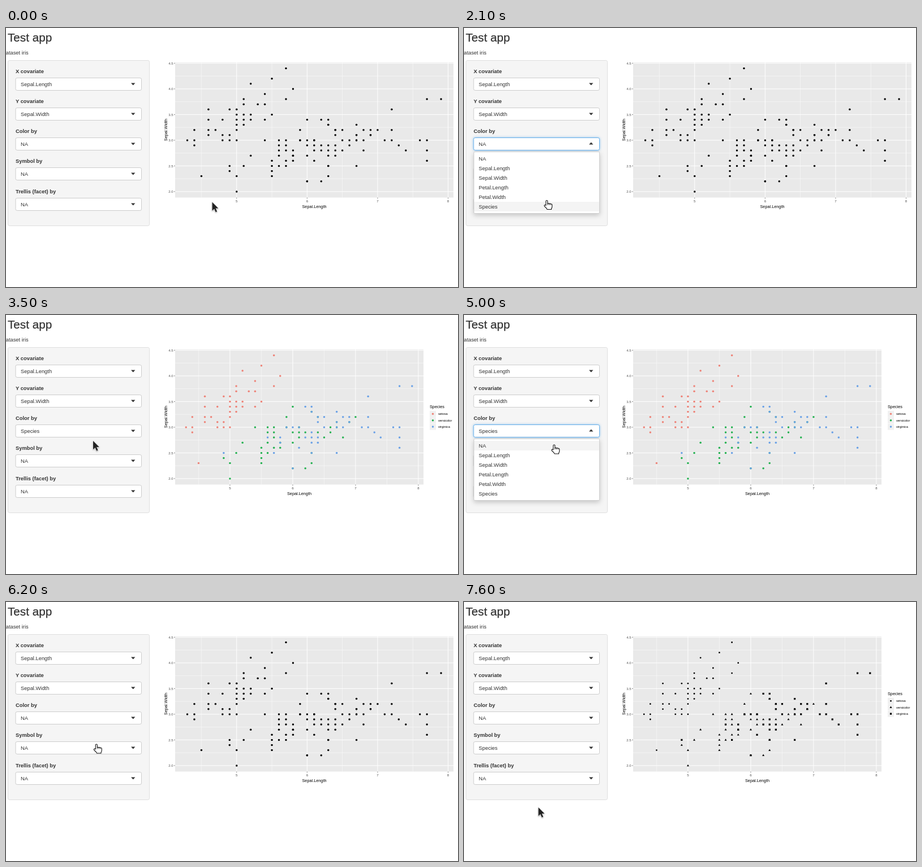
Recreate the animation shown at these times as an HTML page. Size 799 by 459 pixels, loop 8 s.

```html
<!DOCTYPE html>
<html lang="en">
<head>
<meta charset="utf-8">
<title>Test app</title>
<style>
  html, body { margin: 0; width: 100%; height: 100%; overflow: hidden; background: #fff; }
  svg { display: block; width: 799px; height: 459px; }
  text { font: 9.35px "Liberation Sans", Arial, sans-serif; fill: #333; white-space: pre; }
  .title { font-size: 20.7px; stroke: #333; stroke-width: .25px; }
  .label { font-weight: bold; }
  .well { fill: #f5f5f5; stroke: #dfdfdf; }
  .box { fill: #fff; stroke: #ccc; }
  .open .box { stroke: #66afe9; filter: drop-shadow(0 0 2px rgba(102, 175, 233, .7)); }
  .menu { fill: #fff; stroke: #d0d0d0; filter: drop-shadow(0 3px 4px rgba(0, 0, 0, .2)); }
  .hover { fill: #f4f4f4; }
  .axis { font-size: 7.3px; fill: #000; }
  .tick { font-size: 6px; fill: #4d4d4d; }
  .key { font-size: 5.7px; fill: #000; }
  .major { stroke: #fff; stroke-width: 1; }
  .minor { stroke: #fff; stroke-width: .45; }
  .mark { stroke: #555; stroke-width: .7; }
</style>
</head>
<body>
<svg id="stage" viewBox="0 0 799 459"></svg>
<script>
const LOOP = 8000, STEP = 100;
const stage = document.getElementById('stage');
const labels = ['X covariate', 'Y covariate', 'Color by', 'Symbol by', 'Trellis (facet) by'];
const options = ['NA', 'Sepal.Length', 'Sepal.Width', 'Petal.Length', 'Petal.Width', 'Species'];
const ROW = 17;

// Sepal widths by sepal length, both in tenths.
const species = [
  { name: 'setosa', color: '#ee8277', points: {
    43: [30], 44: [29, 30, 32], 45: [23], 46: [31, 32, 34, 36], 47: [32], 48: [30, 31, 34],
    49: [30, 31, 36], 50: [30, 32, 33, 34, 35, 36], 51: [33, 34, 35, 37, 38], 52: [34, 35, 41],
    53: [37], 54: [34, 37, 39], 55: [35, 42], 57: [38, 44], 58: [40] } },
  { name: 'versicolor', color: '#22b14f', points: {
    49: [24], 50: [20, 23], 51: [25], 52: [27], 54: [30], 55: [23, 24, 25, 26],
    56: [25, 27, 29, 30], 57: [26, 28, 29, 30], 58: [26, 27], 59: [30, 32], 60: [22, 27, 29, 34],
    61: [28, 29, 30], 62: [22, 29], 63: [23, 25, 33], 64: [29, 32], 65: [28], 66: [29, 30],
    67: [30, 31], 68: [28], 69: [31], 70: [32] } },
  { name: 'virginica', color: '#68a0e6', points: {
    49: [25], 56: [28], 57: [25], 58: [27, 28], 59: [30], 60: [22, 30], 61: [26, 30], 62: [28, 34],
    63: [25, 27, 28, 29, 33, 34], 64: [27, 28, 31, 32], 65: [30, 32], 67: [25, 30, 31, 33],
    68: [30, 32], 69: [31, 32], 71: [30], 72: [30, 32, 36], 73: [29], 74: [28], 76: [30],
    77: [26, 28, 30, 38], 79: [38] } }
];

const text = (x, y, str, cls = '', extra = '') => `<text x="${x}" y="${y}" class="${cls}" ${extra}>${str}</text>`;
const line = (x1, y1, x2, y2, cls) => `<line x1="${x1}" y1="${y1}" x2="${x2}" y2="${y2}" class="${cls}"/>`;
const rect = (x, y, w, h, cls, r = 0) => `<rect x="${x}" y="${y}" width="${w}" height="${h}" rx="${r}" class="${cls}"/>`;
const middle = 'text-anchor="middle"';
const boxY = i => 99.5 + Math.floor(53.3 * i);

function marker(x, y, kind, index) {
  const fill = kind === 'color' ? species[index].color : '#000';
  if (kind === 'shape' && index === 1)
    return `<path d="M${x} ${y - 2.1}l2 3.4h-4z" fill="${fill}"/>`;
  if (kind === 'shape' && index === 2)
    return `<rect x="${x - 1.6}" y="${y - 1.6}" width="3.2" height="3.2" fill="${fill}"/>`;
  return `<circle cx="${x}" cy="${y}" r="${kind === 'shape' ? 1.4 : 1.75}" fill="${fill}"/>`;
}

function plot(kind) {
  const plain = kind === 'plain';
  const right = plain ? 791 : 738;
  const px = v => plain ? 407.7 + (v - 5) * 124.6 : 395.9 + (v - 5) * 111;
  const py = v => 289.9 - (v - 2) * 91;
  const mid = (299 + right) / 2;
  let out = `<rect x="299" y="61" width="${right - 299}" height="239.5" fill="#e9e9e9"/>`;
  for (let v = 4.5; v < 8; v++) out += line(px(v), 61, px(v), 300.5, 'minor');
  for (let v = 2.25; v < 4.5; v += .5) out += line(299, py(v), right, py(v), 'minor');
  for (let v = 5; v <= 8; v++) {
    out += line(px(v), 61, px(v), 300.5, 'major') + line(px(v), 300.5, px(v), 302.5, 'mark') +
      text(px(v), 309, v, 'tick', middle);
  }
  for (let v = 2; v <= 4.5; v += .5) {
    out += line(299, py(v), right, py(v), 'major') + line(297, py(v), 299, py(v), 'mark') +
      text(295.5, py(v) + 2.2, v.toFixed(1), 'tick', 'text-anchor="end"');
  }
  out += text(mid, 319, 'Sepal.Length', 'axis', middle) +
    text(0, 0, 'Sepal.Width', 'axis', middle + ' transform="translate(284.5 180.5) rotate(-90)"');
  species.forEach((s, i) => {
    for (const [x, ys] of Object.entries(s.points))
      for (const y of ys) out += marker(px(x / 10), py(y / 10), kind, i);
  });
  if (!plain) {
    out += text(749, 164.5, 'Species', 'axis');
    species.forEach((s, i) => {
      const y = 175.3 + i * 11.4;
      out += `<rect x="749" y="${y - 5.5}" width="11" height="11" fill="#f0f0f0"/>` +
        marker(754.5, y, kind, i) + text(764, y + 2.1, s.name, 'key');
    });
  }
  return `<g id="${kind}">${out}</g>`;
}

function control(i) {
  const y = boxY(i);
  return text(17, y - 19.5, labels[i], 'label') +
    `<g id="select${i}">` + rect(17, y - 11, 222.5, 22, 'box', 2.7) +
    text(26, y + 3.4, options[i < 2 ? i + 1 : 0], 'value') +
    `<path class="caret" d="M221 ${y - 2}h7.4l-3.7 4z" fill="#333"/></g>`;
}

const menu = '<g id="menu">' + rect(17.5, 219.5, 222, 109, 'menu', 1.5) +
  '<rect id="hover" x="18" y="223" width="221" height="17" class="hover"/>' +
  options.map((o, i) => text(26, 234.9 + i * ROW, o)).join('') + '</g>';

const cursors = `
  <g id="arrow"><path d="M0 0V15.2L3.6 12L6.1 17.8L8.6 16.7L6.1 11.1H10.8Z"
    fill="#222" stroke="#fff" stroke-width="1" paint-order="stroke" style="filter:drop-shadow(0 1px 1px rgba(0,0,0,.35))"/></g>
  <g id="hand" fill="#fff" stroke="#111" stroke-width="1.1" stroke-linejoin="round">
    <path d="M-1.7 9V1.5a1.5 1.5 0 0 1 3 0V6q1.4-1.2 2.8 0q1.4-1 2.7.3q2.4-.4 2.4 1.9V11q0 2-1.2 3.4V16H.6Q-1 13-4 10.8Q-5.4 8.6-3.5 8Q-2.4 8-1.7 9Z"/>
    <path d="M1.3 6v2.5M4.1 6v2.5M6.8 6.3v2.2" stroke-width=".8"/></g>
  <g id="beam" fill="none"><path d="M-2.5-6Q0-6 0-4.5Q0-6 2.5-6M0-5V5M-2.5 6Q0 6 0 4.5Q0 6 2.5 6M-1.3 1.8H1.3"
    stroke="#fff" stroke-width="2.4"/><path d="M-2.5-6Q0-6 0-4.5Q0-6 2.5-6M0-5V5M-2.5 6Q0 6 0 4.5Q0 6 2.5 6M-1.3 1.8H1.3"
    stroke="#111" stroke-width="1.1"/></g>`;

stage.innerHTML = text(3, 24, 'Test app', 'title') + text(-.3, 47, 'ataset iris') +
  rect(3.5, 57.5, 250, 293, 'well', 2.7) + labels.map((_, i) => control(i)).join('') +
  '<g id="plots">' + ['plain', 'color', 'shape'].map(plot).join('') + '</g>' + menu +
  '<line id="insert" stroke="#222" stroke-width="1"/>' + cursors;

const $ = id => document.getElementById(id);
const show = (id, on) => $(id).style.display = on ? '' : 'none';

// Pointer path: time, x, y, shape from that time on.
const path = [
  [0, 364.5, 308.5, 'arrow'], [500, 364.5, 308.5, 'arrow'], [1100, 160, 204, 'hand'],
  [1300, 160.5, 205, 'beam'], [1700, 160.5, 205, 'beam'], [1800, 158, 221, 'hand'],
  [2100, 146.5, 305.5, 'hand'], [3000, 146.5, 305.5, 'hand'], [3100, 152, 262, 'hand'],
  [3200, 154, 230, 'arrow'], [3400, 154, 230, 'arrow'], [3500, 154, 223, 'arrow'],
  [3700, 156, 220, 'arrow'], [3900, 156, 220, 'arrow'], [4000, 163.5, 213, 'hand'],
  [4400, 164, 212, 'beam'], [4700, 164, 212, 'beam'], [4800, 163, 219, 'hand'],
  [5000, 159.5, 230, 'hand'], [5300, 159.5, 232, 'arrow'], [5800, 159.5, 232, 'arrow'],
  [5900, 159.5, 238, 'arrow'], [6000, 160, 249, 'hand'], [6200, 160, 252, 'hand'],
  [6400, 160, 253, 'beam'], [6700, 160, 253, 'beam'], [6800, 146, 300, 'hand'],
  [6900, 136, 339, 'hand'], [7000, 136, 339, 'hand'], [7300, 132, 364.5, 'hand'],
  [7500, 131.5, 364, 'arrow'], [LOOP, 131.5, 364, 'arrow']
];
const menus = [
  { from: 1300, to: 2400, box: 2, row: 0 },
  { from: 4400, to: 5300, box: 2, row: 5 },
  { from: 6400, to: 7500, box: 3, row: 0 }
];
const within = (t, a, b) => t >= a && t < b;

function pointer(t) {
  const i = path.findLastIndex(k => k[0] <= t);
  const [t0, x0, y0, shape] = path[i], [t1, x1, y1, next] = path[i + 1] || path[i];
  // Shape switches without travel keep their place until the switch.
  if (shape !== next && (next === 'beam' || t1 === 5300 || t1 === 7500)) return [x0, y0, shape];
  const p = t1 > t0 ? (t - t0) / (t1 - t0) : 0;
  const e = p * p * (3 - 2 * p);
  return [x0 + (x1 - x0) * e, y0 + (y1 - y0) * e, shape];
}

function draw(time) {
  const t = Math.floor(time / STEP) * STEP;
  const [x, y, shape] = pointer(t);
  for (const id of ['arrow', 'hand', 'beam']) show(id, id === shape);
  $(shape).setAttribute('transform', `translate(${x} ${y})`);

  const open = menus.find(m => within(t, m.from, m.to));
  const values = { 2: within(t, 2400, 5300) ? 5 : 0, 3: t >= 7500 ? 5 : 0 };
  for (const i of [2, 3]) {
    const g = $('select' + i), active = !!open && open.box === i;
    g.classList.toggle('open', active);
    g.querySelector('.value').textContent = options[values[i]];
    const cy = boxY(i);
    g.querySelector('.caret').setAttribute('d', active ? `M221 ${cy + 1}h7.4l-3.7-4z` : `M221 ${cy - 2}h7.4l-3.7 4z`);
  }

  show('menu', open);
  if (open) {
    const shift = boxY(open.box) - boxY(2);
    const under = Math.floor((y + 5 - 223 - shift) / ROW);
    const row = shape === 'hand' && under >= 0 ? Math.min(under, 5) : open.row;
    $('menu').setAttribute('transform', `translate(0 ${shift})`);
    $('hover').setAttribute('y', 223 + row * ROW);
    const cy = boxY(open.box), cx = values[open.box] ? 60.5 : 39.5;
    for (const [k, v] of Object.entries({ x1: cx, x2: cx, y1: cy - 5, y2: cy + 5 })) $('insert').setAttribute(k, v);
  }
  show('insert', within(t, 1300, 1800) || within(t, 4400, 4800) || within(t, 6400, 6800) || within(t, 7300, 7500));

  const kind = t >= 7600 ? 'shape' : within(t, 2600, 5400) ? 'color' : 'plain';
  for (const id of ['plain', 'color', 'shape']) show(id, id === kind);
  $('plots').setAttribute('opacity', within(t, 2400, 2600) ? .92 : 1);
}

const start = performance.now();
function tick(now) {
  draw(Math.max(0, now - start) % LOOP);
  requestAnimationFrame(tick);
}
draw(0);
requestAnimationFrame(tick);
</script>
</body>
</html>
```
